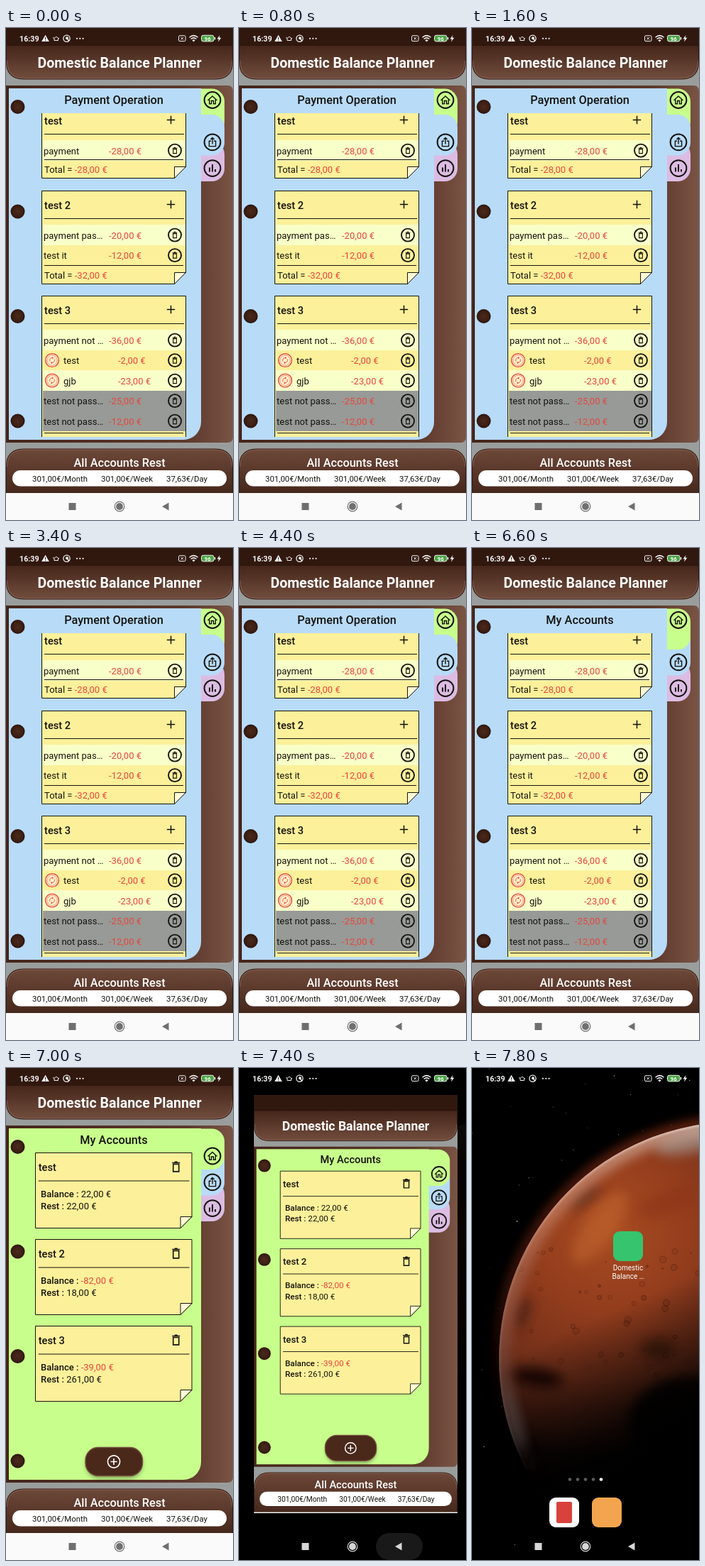
These frames come from a looping animation (320x693 px, 8 s). An HTML page:

```html
<!DOCTYPE html>
<html lang="en">
<head>
<meta charset="utf-8">
<title>Budget app</title>
<style>
  html, body { margin: 0; width: 100%; height: 100%; overflow: hidden; background: #000; }
  svg { display: block; width: 100vw; height: 100vh; }
  text { font-family: Roboto, "Noto Sans", sans-serif; white-space: pre; }
  .m { font-weight: 500; }
  .b { font-weight: 700; }
  .mid { text-anchor: middle; }
</style>
</head>
<body>
<svg id="stage" viewBox="0 0 320 693" xmlns="http://www.w3.org/2000/svg"></svg>
<script>
const LOOP = 8000, STEP = 200;
const INK = '#15130f', RED = '#e8453c', BLUE = '#b8dbf8', GREEN = '#c8fe8c', PURPLE = '#dcbce3', NOTE = '#fcf09a';
const stage = document.getElementById('stage');

const text = (x, y, s, size = 13.04, cls = '', fill = INK) =>
  `<text x="${x}" y="${y}" font-size="${size}" class="${cls}" fill="${fill}">${s}</text>`;
const rect = (x, y, w, h, fill, rx = 0, more = '') =>
  `<rect x="${x}" y="${y}" width="${w}" height="${h}" rx="${rx}" fill="${fill}" ${more}/>`;
const disc = (x, y, r, fill, more = '') => `<circle cx="${x}" cy="${y}" r="${r}" fill="${fill}" ${more}/>`;
const line = (d, w = 1, color = INK, more = '') =>
  `<path d="${d}" fill="none" stroke="${color}" stroke-width="${w}" ${more}/>`;
const fillPath = (d, fill, more = '') => `<path d="${d}" fill="${fill}" ${more}/>`;
const at = (x, y, body) => `<g transform="translate(${x} ${y})">${body}</g>`;
const group = (id, body, more = '') => `<g id="${id}" ${more}>${body}</g>`;
const stops = (...list) => list.map(([o, c, a = 1]) =>
  `<stop offset="${o}" stop-color="${c}" stop-opacity="${a}"/>`).join('');

const PLANET = { x: 372, y: 410, r: 334 };
const defs = `<defs>
  <linearGradient id="bar" x2="0" y2="1">${stops([0, '#45261a'], [1, '#714d3e'])}</linearGradient>
  <linearGradient id="foot" x2="0" y2="1">${stops([0, '#6d4839'], [1, '#45271b'])}</linearGradient>
  <linearGradient id="cover">${stops([0, '#43241a'], [.8, '#5d392b'], [.9, '#6b4638'], [1, '#7a5545'])}</linearGradient>
  <radialGradient id="hole">${stops([0, '#4b2a1c'], [.7, '#3d1f14'], [1, '#2b130b'])}</radialGradient>
  <radialGradient id="mars" gradientUnits="userSpaceOnUse" cx="195" cy="225" r="330">${stops(
    [0, '#a94c22'], [.35, '#933d1d'], [.65, '#74301a'], [.9, '#431a0f'], [1, '#1a0a06'])}</radialGradient>
  <linearGradient id="rim" gradientUnits="userSpaceOnUse" x1="280" y1="80" x2="80" y2="580">${stops(
    [0, '#e0c8bc'], [.35, '#c98a70'], [.65, '#946052', .9], [.9, '#4a4040', .6], [1, '#111', 0])}</linearGradient>
  <linearGradient id="glow" gradientUnits="userSpaceOnUse" x1="280" y1="80" x2="80" y2="540">${stops(
    [0, '#c2431f'], [.6, '#8a2d16', .8], [1, '#300', 0])}</linearGradient>
  <linearGradient id="night" gradientUnits="userSpaceOnUse" x1="135" y1="370" x2="225" y2="570">${stops(
    [0, '#000', 0], [.45, '#000', .5], [.85, '#000', .97], [1, '#000'])}</linearGradient>
  <filter id="soft" x="-60%" y="-60%" width="220%" height="220%"><feGaussianBlur stdDeviation="8"/></filter>
  <filter id="thin"><feGaussianBlur stdDeviation="1.5"/></filter>
  <filter id="drop" x="-30%" y="-30%" width="160%" height="180%"><feGaussianBlur stdDeviation="3"/></filter>
  <clipPath id="ball">${disc(PLANET.x, PLANET.y, PLANET.r, '#fff')}</clipPath>
  <clipPath id="scroll"><rect x="40" y="120" width="230" height="456"/></clipPath>
  <clipPath id="frame"><rect width="320" height="656.6"/></clipPath>
</defs>`;

// Icons, all centred on 0,0
const ringBin = disc(0, 0, 9, 'none', `stroke="${INK}" stroke-width="1.9"`) +
  line('M-3.3 -3.4H3.3M-1.2 -4.2H1.2M-2.4 -2V4H2.4V-2Z', 1.1);
const bigBin = line('M-5.5 -5.8H5.5M-2 -7H2M-4 -3.8V6.6H4V-3.8Z', 1.6);
const plus = line('M-5.7 0H5.7M0 -5.7V5.7', 1.5);
const sync = disc(0, 0, 9.4, '#fdf0c8', `stroke="${RED}" stroke-width="1.4"`) +
  disc(0, 0, 7.2, 'none', `stroke="${RED}" stroke-width=".5"`) +
  line('M-3 1.6A3.4 3.4 0 0 1 .4 -3.4M3 -1.6A3.4 3.4 0 0 1 -.4 3.4', .9, RED) +
  fillPath('M0 -5.1L2.1 -3.4L0 -1.7ZM0 5.1L-2.1 3.4L0 1.7Z', RED);
const tabRing = disc(0, 0, 11.4, 'none', `stroke="${INK}" stroke-width="2"`);
const homeIcon = tabRing + line('M-6.5 .4L0 -5.6L6.5 .4M-4.3 -.8V5.2H-1.5V1H1.5V5.2H4.3V-.8', 1.4);
const shareIcon = tabRing + line('M-2 -1.6H-4.6V5.8H4.6V-1.6H2M0 2.6V-6M-2.6 -3.8L0 -6.4L2.6 -3.8', 1.4);
const chartIcon = tabRing + line('M-4 -1V5M0 -5.5V5M4 1.5V5', 2);

// Payment list
function paper(x0, y0, x1, y1) {
  const fx = x1 - 16, fy = y1 - 16;
  return fillPath(`M${x0} ${y0}H${x1}V${fy}L${fx} ${y1}H${x0}Z`, NOTE, `stroke="${INK}"`) +
    fillPath(`M${fx} ${y1}V${fy}H${x1}Z`, '#fffdd6', `stroke="${INK}"`);
}
function row(y, i, [label, sum, kind]) {
  const sub = kind === 'sub', fill = kind === 'off' ? '#979a97' : i % 2 ? NOTE : '#f9ffc8';
  return rect(51.5, y, 201, 28.5, fill, 0, 'shape-rendering="crispEdges"') + (sub ? at(65, y + 14.2, sync) : '') +
    text(sub ? 81 : 53, y + 19.2, label) + text(sub ? 158 : 145, y + 19.2, sum + ' €', 13.04, '', RED) +
    at(238, y + 14.3, ringBin);
}
function payNote(y, name, total, rows) {
  const end = Math.floor(y + 46 + 29.4 * rows.length) + .5;
  return paper(50.5, y, 253.5, end + 26) + text(54, y + 25, name, 14.67, 'm') + at(232.5, y + 19, plus) +
    line(`M54 ${y + 39}H251`) + rows.map((r, i) => row(y + 47.8 + 28.5 * i, i, r)).join('') +
    line(`M54 ${end}H250`) + text(54, end + 18.8, `Total = <tspan fill="${RED}">${total} €</tspan>`);
}
const payments = payNote(110.5, 'test', '-28,00', [['payment', '-28,00']]) +
  payNote(229.5, 'test 2', '-32,00', [['payment pas…', '-20,00'], ['test it', '-12,00']]) +
  payNote(377.5, 'test 3', '-98,00', [['payment not …', '-36,00'], ['test', '-2,00', 'sub'],
    ['gjb', '-23,00', 'sub'], ['test not pass…', '-25,00', 'off'], ['test not pass…', '-12,00', 'off']]);

// Account list
function account(i, name, balance, rest) {
  const y = 119.5 + 122 * i, color = balance[0] === '-' ? RED : INK;
  const entry = (dy, key, value, fill) =>
    text(49, y + dy, `<tspan class="m">${key} :</tspan> <tspan fill="${fill}">${value} €</tspan>`);
  return paper(41.5, y, 262, y + 106) + text(45.7, y + 25.2, name, 14.67, 'm') + at(239.7, y + 19.8, bigBin) +
    line(`M45.7 ${y + 39.5}H258.6`) + entry(62.2, 'Balance', balance, color) + entry(79.4, 'Rest', rest, INK);
}
const accounts = account(0, 'test', '22,00', '22,00') + account(1, 'test 2', '-82,00', '18,00') +
  account(2, 'test 3', '-39,00', '261,00') +
  rect(113, 538, 79, 40, '#000', 18, 'opacity=".35" filter="url(#drop)"') +
  rect(112, 534.5, 80.5, 40, '#4a291b', 18, 'stroke="#77503f" stroke-width="1.4"') +
  disc(152, 554.5, 8.6, 'none', 'stroke="#fff" stroke-width="1.6"') + line('M147.5 554.5H156.5M152 550V559', 1.6, '#fff');

// Index tabs with rounded right side
const tab = (y0, y1, fill) =>
  fillPath(`M274 ${y0}H290A18 18 0 0 1 308 ${y0 + 18}V${y1 - 18}A18 18 0 0 1 290 ${y1}H274Z`, fill);
const payTabs = tab(160, 216, PURPLE) + tab(85.5, 150, GREEN) + tab(122, 179.5, BLUE);
const accTabs = tab(160, 216, PURPLE) + tab(110, 179.5, BLUE) + tab(85.5, 143, GREEN);

const app = rect(0, 0, 320, 657, '#999d9c') + rect(0, 0, 320, 25, '#31180f') +
  fillPath('M.5 24.5H319.5V48Q319.5 72 295 72H25Q.5 72 .5 48Z', 'url(#bar)', 'stroke="#2d150d"') +
  line('M1.5 46Q1.5 70.8 26 70.8H294Q318.5 70.8 318.5 46', 1, '#87604f') +
  text(160, 56, 'Domestic Balance Planner', 19.55, 'b mid', '#fff') +
  rect(-6, 81, 326, 503, 'url(#cover)', 7) +
  group('payTabs', payTabs) + group('accTabs', accTabs) +
  fillPath('M4 85H275V555A25 25 0 0 1 250 580H4Z', BLUE, 'id="page"') +
  [111, 258.5, 406, 553.5].map(y => disc(16.5, y, 10, 'url(#hole)')).join('') +
  text(152, 107, '', 16.3, 'm mid').replace('<text', '<text id="title"') +
  group('payments', payments, 'clip-path="url(#scroll)"') + group('accounts', accounts) +
  group('home', homeIcon) + at(291, 160.8, shareIcon) + at(291, 197.6, chartIcon) +
  fillPath('M.5 657V617Q.5 593 25 593H295Q319.5 593 319.5 617V657Z', 'url(#foot)', 'stroke="#2d150d"') +
  line('M1.5 618Q1.5 594.2 26 594.2H294Q318.5 594.2 318.5 618', 1, '#87604f') +
  text(160, 618, 'All Accounts Rest', 16.3, 'm mid', '#fff') + rect(9, 623, 302, 22.6, '#fff', 11.3) +
  text(37, 639, '301,00€/Month', 11.4) + text(134, 639, '301,00€/Week', 11.4) + text(226, 639, '37,63€/Day', 11.4) +
  rect(0, 655, 320, 2, '#fafafa');

// Wallpaper: seeded stars and a soft planet with seeded craters
let seed = 7;
const rnd = (lo, hi) => {
  seed = seed * 16807 % 2147483647;
  return (lo + (hi - lo) * seed / 2147483647).toFixed(2);
};
const scatter = (n, make) => Array.from({ length: n }, make).join('');
const stars = scatter(90, () => disc(rnd(0, 320), rnd(0, 693), rnd(.3, .8), '#fff', `opacity="${rnd(.3, .9)}"`));
const craters = scatter(45, () =>
  disc(rnd(60, 320), rnd(250, 440), rnd(.8, 5), '#3a140a', `fill-opacity=".2" stroke="#35120a" stroke-width=".8" opacity="${rnd(.2, .7)}"`));
const blob = (x, y, rx, ry, fill, a, turn = 0) =>
  `<ellipse cx="${x}" cy="${y}" rx="${rx}" ry="${ry}" fill="${fill}" opacity="${a}" transform="rotate(${turn} ${x} ${y})" filter="url(#soft)"/>`;
const globe = (fill, more = '') => disc(PLANET.x, PLANET.y, PLANET.r, fill, more);
const limb = (paint, width, blur, a) =>
  globe('none', `stroke="url(#${paint})" stroke-width="${width}" filter="url(#${blur})" opacity="${a}"`);
const planet = limb('glow', 12, 'soft', .7) + '<g clip-path="url(#ball)">' + globe('url(#mars)') +
  blob(180, 225, 22, 60, '#c46a30', .5, 35) + blob(160, 183, 28, 8, '#4a2a22', .6, -38) +
  blob(312, 102, 55, 16, '#a39187', .75, -14) + blob(275, 190, 45, 16, '#8a3018', .5, -20) +
  blob(72, 345, 10, 24, '#3a1a12', .6, 20) + blob(262, 395, 24, 15, '#1c0a06', .5) +
  craters + blob(92, 436, 36, 13, '#0d0605', .85, 8) + blob(310, 500, 90, 65, '#000', .9) +
  rect(0, 0, 320, 693, 'url(#night)') + blob(58, 490, 10, 50, '#5a4e4c', .5, -14) +
  limb('rim', 30, 'soft', .6) + limb('rim', 5, 'thin', .9) + '</g>';

const launcher = rect(199, 230, 42, 42, '#36c46f', 9) +
  text(220, 285, 'Domestic', 10, 'mid', '#fff') + text(220, 297, 'Balance …', 10, 'mid', '#fff') +
  [0, 1, 2, 3, 4].map(i => disc(138 + 11 * i, 579.5, 2.3, i === 4 ? '#fff' : '#5c5c5c')).join('') +
  rect(109, 605, 42, 42, '#fff', 9) + rect(119, 611, 22, 30, '#d9423c', 2) + rect(169, 605, 42, 42, '#f2a54e', 9);

const W = '#f4f4f4';
const status = text(19, 18.6, '16:39', 10.7, 'b', W) +
  fillPath('M55.5 9.8L60.8 19H50.2Z', W) + line('M55.5 13V16M55.5 16.8V18', 1, '#222') +
  line('M66 13.5L68 14.5V17.5H73.5V14.5Q71 10.5 68 14.5M73.5 15.5L75 14', 1, W) +
  disc(85.5, 14.7, 4.6, 'none', `stroke="${W}" stroke-width="1.3"`) + disc(86, 14.2, 2, W) + line('M86 14.5L89 18.5', 1.4, W) +
  [100, 104.3, 108.6].map(x => disc(x, 14.8, 1.1, W)).join('') +
  rect(243.5, 10.8, 9.5, 7.8, 'none', 1.5, `stroke="${W}"`) + line('M246.5 13L250 16.5M250 13L246.5 16.5', 1, W) +
  line('M258.5 13.2Q264.5 8 270.5 13.2M260.6 15.5Q264.5 12.2 268.4 15.5', 1.5, W) + fillPath('M262.3 17.2Q264.5 15.2 266.7 17.2L264.5 19.6Z', W) +
  rect(275.5, 10.3, 17.5, 8.6, '#4aa544', 2.5, `stroke="${W}"`) + rect(293.8, 13, 1.4, 3.4, W) +
  text(284.2, 17.6, '96', 7.6, 'b mid', '#fff') + fillPath('M301.5 10L297.5 15.5H300L299 19.6L303.4 13.7H300.7Z', W);

const nav = rect(0, 655, 320, 38, '#fafafa', 0, 'id="navBack"') +
  rect(193, 655, 66, 38, '#191919', 19, 'id="press"') +
  group('keys', rect(88.5, 669, 10, 10, 'currentColor') +
    disc(160, 674, 6.8, 'none', 'stroke="currentColor" stroke-width="1.2"') + disc(160, 674, 4.9, 'currentColor') +
    fillPath('M220 674L229.5 668.5V679.5Z', 'currentColor'));

stage.innerHTML = defs + rect(0, 0, 320, 693, '#000') + group('wall', stars + planet) + group('launcher', launcher) +
  group('app', app, 'clip-path="url(#frame)"') + nav + status;

const el = id => document.getElementById(id);
const set = (id, name, value) => el(id).setAttribute(name, value);
const show = (id, on) => set(id, 'visibility', on ? 'visible' : 'hidden');

// The window closes towards its launcher tile: centre, scale, fade and wallpaper light
function closing(t) {
  if (t < 7400) return { x: 160, y: 328.3, s: 1, fade: 1, light: 0 };
  if (t < 7600) return { x: 164.5, y: 332.5, s: .897, fade: 1, light: .06 };
  if (t < 7800) return { x: 196, y: 286, s: .45, fade: .75, light: .6 };
  return { x: 220, y: 251, s: .13, fade: 0, light: 1 };
}

function draw(time) {
  const t = Math.floor(time / STEP) * STEP;
  const toAccounts = t >= 6600, listed = t >= 7000, leaving = t >= 7400;
  el('title').textContent = toAccounts ? 'My Accounts' : 'Payment Operation';
  show('payTabs', !toAccounts);
  show('accTabs', toAccounts);
  show('payments', !listed);
  show('accounts', listed);
  set('page', 'fill', listed ? GREEN : BLUE);
  set('home', 'transform', `translate(291 ${listed ? 124 : 101.5})`);

  const c = closing(t);
  set('app', 'transform', `translate(${c.x - 160 * c.s} ${c.y - 328.3 * c.s}) scale(${c.s})`);
  set('app', 'opacity', c.fade);
  set('wall', 'opacity', c.light);
  set('launcher', 'opacity', t >= 7800 ? 1 : t >= 7600 ? .5 : 0);
  show('navBack', !leaving);
  show('press', leaving && t < 7600);
  set('keys', 'color', leaving ? '#d6d6d6' : '#6f6f6f');
}

const start = performance.now();
function tick() {
  draw((performance.now() - start) % LOOP);
  requestAnimationFrame(tick);
}
tick();
</script>
</body>
</html>
```
